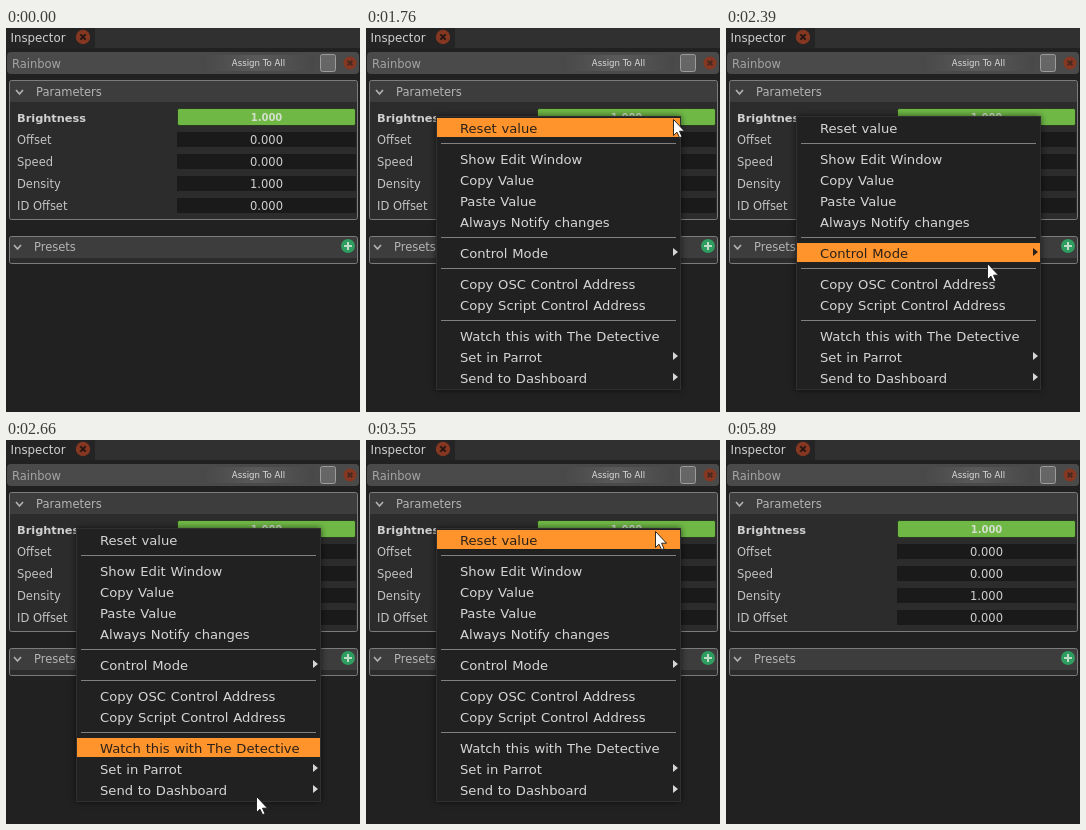
An HTML page for the animation above (7890 ms loop, 354 px wide and 384 px high).

```html
<!DOCTYPE html>
<html lang="en">
<head>
<meta charset="utf-8">
<title>Inspector</title>
<style>
  html, body { margin: 0; width: 100%; height: 100%; overflow: hidden; background: #212121; }
  svg { display: block; font: 11.5px "DejaVu Sans", sans-serif; fill: #c4c4c4; }
  .menu { font-size: 13.15px; word-spacing: .6px; }
  .menu-back { fill: #212121; stroke: #303030; filter: drop-shadow(0 0 3px rgba(0, 0, 0, .6)); }
</style>
</head>
<body>
<svg id="stage" width="354" height="384" viewBox="0 0 354 384"></svg>
<script>
const LOOP = 7890, STEP = 68.8;
const MENU_IN = 890, MENU_OUT = 4220, MENU_GONE = 4350, HOVER_START = 1760;

const rect = (x, y, w, h, fill, extra = '') =>
  `<rect x="${x}" y="${y}" width="${w}" height="${h}" fill="${fill}" ${extra}/>`;
const text = (x, y, label, extra = '') => `<text x="${x}" y="${y}" ${extra}>${label}</text>`;
const line = (d, stroke, width = 1) =>
  `<path d="${d}" fill="none" stroke="${stroke}" stroke-width="${width}"/>`;
const disc = (x, y, r, fill) => `<circle cx="${x}" cy="${y}" r="${r}" fill="${fill}"/>`;
const cross = (x, y, r, color) =>
  line(`M${x - r} ${y - r}l${2 * r} ${2 * r}m0 ${-2 * r}l${-2 * r} ${2 * r}`, color, 2);

function panel(y, height, title, titleX, baseline) {
  return rect(3.5, y + .5, 348, height, '#2c2c2c', 'rx="2"') +
    rect(4, y + 1, 347, 21, '#3d3d3d') +
    rect(3.5, y + .5, 348, height, 'none', 'rx="2" stroke="#7c7c7c"') +
    line(`M${titleX - 20} ${baseline - 6}l3.5 4l3.5 -4`, '#b0b0b0', 1.7) +
    text(titleX, baseline, title, 'fill="#b4b4b4"');
}

function parameter([name, value], i) {
  const y = 90 + 22 * i, active = i === 0;
  const label = active ? 'font-weight="bold" font-size="11.35" fill="#d0d0d0"' : '';
  const number = active ? 'font-weight="bold" font-size="10" fill="#d3dfca"' : 'fill="#d0d0d0"';
  return text(11, y + 4, name, label) +
    (active ? rect(171.5, 80.5, 178, 17, '#6fb846', 'rx="2" stroke="#2a3a20"')
            : rect(171, y - 8, 179, 15, '#1a1a1a')) +
    text(260.5, y + (active ? 3.3 : 4), value, `text-anchor="middle" ${number}`);
}

const parameters = [['Brightness', '1.000'], ['Offset', '0.000'], ['Speed', '0.000'],
  ['Density', '1.000'], ['ID Offset', '0.000']];

const inspector = `
  <defs><linearGradient id="button">
    <stop offset="0" stop-color="#484848"/><stop offset=".5" stop-color="#5a5a5a"/>
    <stop offset="1" stop-color="#484848"/>
  </linearGradient></defs>` +
  rect(0, 0, 354, 384, '#212121') + rect(89, 0, 265, 20, '#303030') + rect(0, 0, 89, 20, '#242424') +
  text(4.5, 14, 'Inspector', 'font-size="11.8" fill="#d0d0d0"') +
  disc(77, 9, 7.2, '#853722') + cross(77, 9, 2.6, '#241612') +
  rect(1, 24, 352, 22, '#4a4a4a', 'rx="4"') + text(6, 40, 'Rainbow', 'fill="#a4a4a4"') +
  rect(195, 27, 113, 16, 'url(#button)', 'rx="2"') +
  text(252.5, 38, 'Assign To All', 'text-anchor="middle" font-size="8.6" fill="#dcdcdc"') +
  rect(314.5, 26.5, 15, 17, '#666', 'rx="2" stroke="#9c9c9c"') +
  disc(344, 35, 6.5, '#853722') + cross(344, 35, 2.3, '#4a2a20') +
  panel(52, 139, 'Parameters', 30, 68) + parameters.map(parameter).join('') +
  panel(208, 27, 'Presets', 28, 223) +
  disc(342, 218, 7, '#2f9c60') + line('M338 218h8m-4 -4v8', '#c0dcc8', 2);

const items = [['Reset value', 100], ['Show Edit Window', 131], ['Copy Value', 152], ['Paste Value', 173],
  ['Always Notify changes', 194], ['Control Mode', 225, true], ['Copy OSC Control Address', 256],
  ['Copy Script Control Address', 277], ['Watch this with The Detective', 308],
  ['Set in Parrot', 329, true], ['Send to Dashboard', 350, true]];

const menuItem = ([label, y, submenu]) => `<g class="item">` +
  rect(71, y - 10, 243, 19, '#ff932c', 'visibility="hidden"') + text(94, y + 5, label) +
  (submenu ? `<path d="M307 ${y - 5}l5 4l-5 4z"/>` : '') + '</g>';

const menu = `<g class="menu" id="menu">
  <rect class="menu-back" x="70.5" y="88.5" width="244" height="273"/>` +
  [115, 209, 240, 292].map(y => line(`M75 ${y + .5}H310`, '#808080')).join('') +
  items.map(menuItem).join('') + '</g>';

const pointer = `<path id="pointer" d="M.5 .5V16.5L4 13.2L6.6 18.7L9 17.7L6.5 12.2H11.5Z"
  fill="#fff" stroke="#181818" stroke-width=".9"/>`;

const stage = document.getElementById('stage');
stage.innerHTML = inspector + menu + pointer;
const menuNode = document.getElementById('menu');
const pointerNode = document.getElementById('pointer');
const itemNodes = [...document.querySelectorAll('.item')];

// Pointer tip: time, x, y
const path = [
  [70, 333, 348], [300, 325, 190], [500, 318, 120], [820, 316, 96], [1759, 316, 96],
  [1760, 307, 91], [1970, 292, 116], [2300, 262, 219], [2379, 261, 235], [2530, 255, 275],
  [2650, 250, 355], [2720, 249, 368], [2790, 249, 340], [2860, 250, 285], [2930, 251, 243],
  [2998, 252, 225], [3350, 270, 129], [3480, 282, 98], [3548, 289, 91], [3749, 289, 91],
  [3750, 318, 86], [3818, 342, 84], [4019, 342, 84], [4020, 334, 88], [5549, 334, 88],
  [5550, 333, 110], [5825, 328, 334]];
const moveStarts = [70, 1760, 3750, 4020, 5550];

function pointerAt(t) {
  const i = path.findIndex(key => key[0] > t);
  if (i < 1) return path[i < 0 ? path.length - 1 : 0].slice(1);
  const [t0, x0, y0] = path[i - 1], [t1, x1, y1] = path[i];
  const k = (t - t0) / (t1 - t0);
  return [Math.round(x0 + (x1 - x0) * k), Math.round(y0 + (y1 - y0) * k)];
}

function steppedTime(t) {
  const start = moveStarts.filter(s => s <= t).pop() ?? 0;
  return start + Math.floor((t - start) / STEP) * STEP;
}

// The highlight trails the pointer by one step.
function hoveredItem(t) {
  if (t < HOVER_START) return -1;
  const [x, y] = pointerAt(Math.max(HOVER_START, t - STEP));
  return x < 315 ? items.findIndex(item => Math.abs(y - item[1]) <= 10) : -1;
}

function menuOpacity(t) {
  if (t < MENU_IN || t >= MENU_GONE) return 0;
  if (t >= MENU_OUT) return .5;
  return t < MENU_IN + 70 ? .6 : 1;
}

function draw(t) {
  const stepped = steppedTime(t);
  const hovered = hoveredItem(stepped);
  menuNode.setAttribute('opacity', menuOpacity(t));
  itemNodes.forEach((node, i) => {
    node.setAttribute('fill', i === hovered ? '#2b2118' : '#d6d6d6');
    node.firstChild.setAttribute('visibility', i === hovered ? 'visible' : 'hidden');
  });
  pointerNode.setAttribute('transform', `translate(${pointerAt(stepped)})`);
  pointerNode.setAttribute('visibility', t >= 70 && t < 5885 ? 'visible' : 'hidden');
}

const origin = performance.now();
function tick() {
  draw((performance.now() - origin) % LOOP);
  requestAnimationFrame(tick);
}
tick();
</script>
</body>
</html>
```
